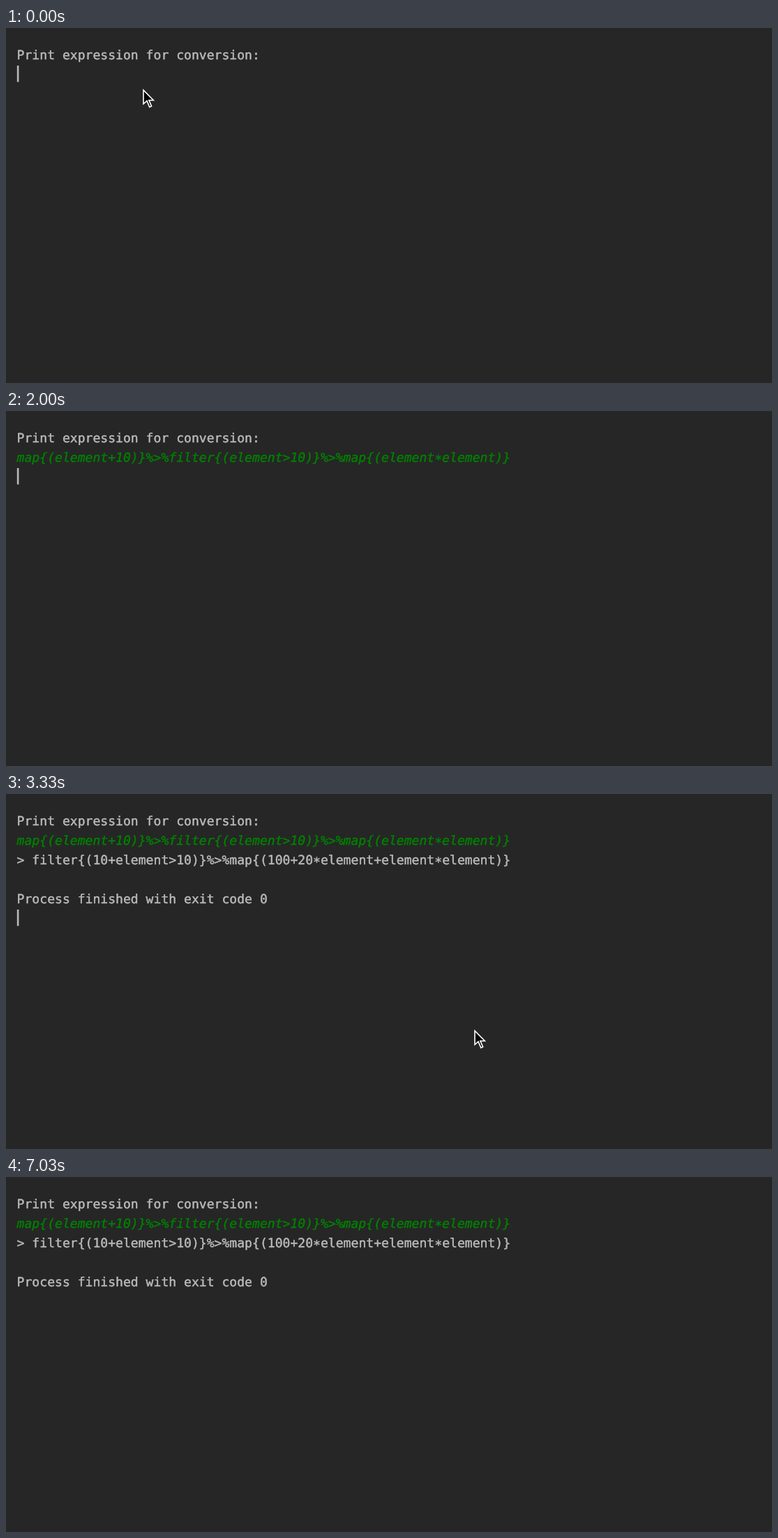
These frames come from a looping animation (1098 by 510 pixels, 8 s). An HTML page:

```html
<!DOCTYPE html>
<html lang="en">
<head>
<meta charset="utf-8">
<title>Expression conversion</title>
<style>
  html, body { margin: 0; width: 100%; height: 100%; overflow: hidden; background: #262626; }
  svg { display: block; width: 1098px; height: 510px; }
  text {
    font: 18.09px "DejaVu Sans Mono", monospace;
    fill: #bbb; stroke: #bbb; stroke-width: .45px;
    text-rendering: geometricPrecision; white-space: pre;
  }
  .input { font-style: italic; fill: #008000; stroke: #008000; }
  .star { baseline-shift: -2.8px; }
  #caret { fill: #bbb; }
  #pointer { fill: #000; stroke: #fff; stroke-width: 1.6; }
</style>
</head>
<body>
<svg viewBox="0 0 1098 510">
  <text x="15.6" y="45">Print expression for conversion:</text>
  <text x="15.6" y="73" class="input" data-from="1270">map{(element+10)}%&gt;%filter{(element&gt;10)}%&gt;%map{(element<tspan class="star">*</tspan>element)}</text>
  <text x="15.6" y="101" data-from="2270">&gt; filter{(10+element&gt;10)}%&gt;%map{(100+20<tspan class="star">*</tspan>element+element<tspan class="star">*</tspan>element)}</text>
  <text x="15.6" y="157" data-from="2630">Process finished with exit code 0</text>
  <rect id="caret" width="2.6" height="23.5"/>
  <path id="pointer" d="M1 2.3V22L6 17.6L9.8 26.6L12.6 25.4L8.9 16.8H15.3Z"/>
</svg>
<script>
  const LOOP = 8000;
  const LEFT = 15.8;

  // [time, x, y]; without a position the part is hidden
  const caretSteps = [
    [0, LEFT, 54], [400], [900, LEFT, 54],
    [1270, 723, 54], [1930], [2000, LEFT, 82],
    [2270, LEFT, 110], [2630, LEFT, 166],
    [3430], [3930, LEFT, 166], [4430], [4930, LEFT, 166], [5330]
  ];
  const pointerSteps = [
    [0, 196, 87], [1230],
    [3100, 620, 324], [3130, 652, 338], [3330, 671, 338],
    [3370, 790, 328], [3400, 1000, 308], [3430]
  ];

  const caret = document.getElementById("caret");
  const pointer = document.getElementById("pointer");
  const lines = document.querySelectorAll("[data-from]");

  const show = (el, visible) => el.setAttribute("visibility", visible ? "visible" : "hidden");

  function place(el, steps, time) {
    const [, x, y] = steps.findLast(step => step[0] <= time);
    show(el, x !== undefined);
    if (x !== undefined) el.setAttribute("transform", `translate(${x} ${y})`);
  }

  function draw(time) {
    for (const line of lines) show(line, time >= +line.dataset.from);
    place(caret, caretSteps, time);
    place(pointer, pointerSteps, time);
  }

  const start = performance.now();
  function tick() {
    draw((performance.now() - start) % LOOP);
    requestAnimationFrame(tick);
  }
  tick();
</script>
</body>
</html>
```
